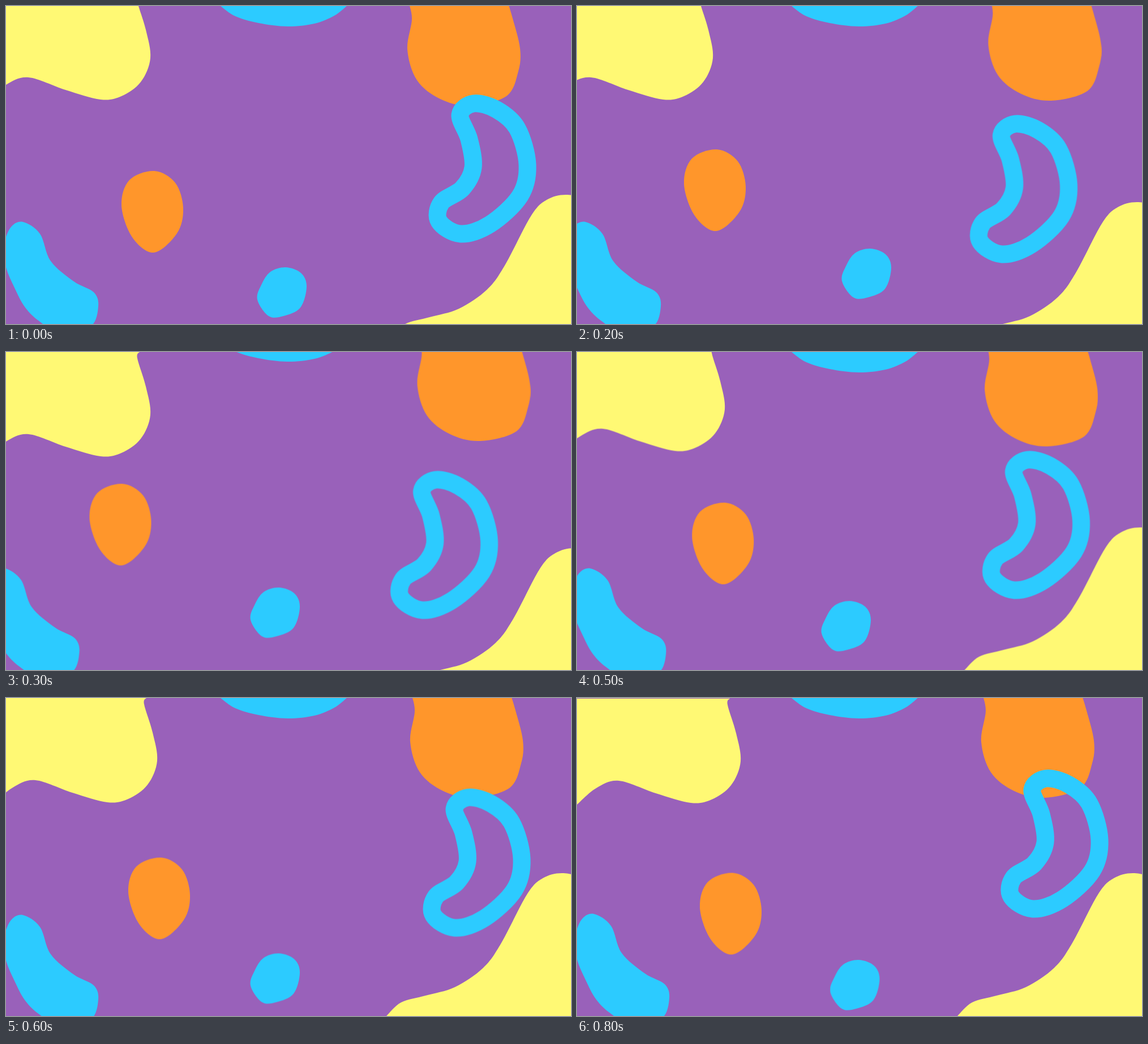
An HTML page that plays this animation: 998 by 561 pixels, repeating every 0.9 s.

```html
<!DOCTYPE html>
<html lang="en">
<head>
<meta charset="utf-8">
<title>Drifting blobs</title>
<style>
  html, body { margin: 0; width: 100%; height: 100%; overflow: hidden; background: #9961ba; }
  svg { display: block; width: 100%; height: 100%; }
</style>
</head>
<body>
<svg id="stage" viewBox="0 0 998 561"></svg>
<script>
const YELLOW = '#fff974', ORANGE = '#ff962b', BLUE = '#2ccbff';
const LOOP = 900, STEPS = 9;
const KEY_STEPS = [0, 2, 3, 4, 6, 8];
const RING_WIDTH = 31;

const stage = document.getElementById('stage');

// Smooth Catmull-Rom curve through "x,y" points, written as cubic Béziers.
// With a tail the curve stays open and ends in those straight edges.
function smoothPath(text, tail) {
  const points = text.split(' ').map(p => p.split(',').map(Number));
  const n = points.length;
  const at = i => points[tail ? Math.max(0, Math.min(n - 1, i)) : (i + n) % n];
  const control = (i, sign) =>
    at(i).map((v, k) => v + sign * (at(i + 1)[k] - at(i - 1)[k]) / 6);
  let d = `M${at(0)}`;
  for (let i = 0; i < (tail ? n - 1 : n); i++) {
    d += ` C${control(i, 1)} ${control(i + 1, -1)} ${at(i + 1)}`;
  }
  return `${d} ${tail}Z`;
}

// Drift holds one "x,y" offset per key step; the motion between them is even.
function addBlob(color, drift, outline, tail = '') {
  const path = document.createElementNS(stage.namespaceURI, 'path');
  path.setAttribute('d', smoothPath(outline, tail));
  path.setAttribute('fill', color);
  stage.append(path);

  const frames = drift.split(' ').map((offset, i) => {
    const [x, y] = offset.split(',');
    return { offset: KEY_STEPS[i] / STEPS, transform: `translate(${x}px, ${y}px)` };
  });
  frames.push({ ...frames.at(-1), offset: 1 });
  path.animate(frames, { duration: LOOP, iterations: Infinity, easing: `steps(${STEPS})` });
  return path;
}

// Corners
addBlob(YELLOW, '0,0 -15,0 0,19 0,0 12,19 34,20',
  '236,-19 232,-8 247,42 255,92 238,134 204,159 167,165 105,148 40,126 0,139 -34,168',
  'L-60,-19');
addBlob(YELLOW, '0,0 0,13 15,13 17.5,-23 -7,-24 -7,-24',
  '679,585 705,561 748,549 800,534 850,500 882,456 927,371 955,342 992,333 1040,345',
  'V620 H679');
addBlob(BLUE, '0,0 -15,0 -33.5,0 -11.5,0 0,2 0,0',
  '30,381 60,402 79,450 120,486 155,505 163,530 150,565 100,580 60,557 34,532 15,497 0,461 -4,425 8,391');

// Top edge
addBlob(BLUE, '0,0 0,0 0,-19 0,0 0,0 0,0',
  '379,0 405,18 446,30 497,36 545,31 580,17 602,0', 'V-30 H379');
addBlob(ORANGE, '0,0 17.5,-9 17.5,-19 17.5,-19 5,0 5,0',
  '709,-12 717,22 709,77 726,131 767,164 820,176 884,159 905,115 908,75 895,22 884,-14',
  'V-40 H709');

// Floating pieces
addBlob(ORANGE, '0,0 -15,-38 -56.5,-58.5 -13.5,-41 12,-9.5 13,17.5',
  '262,291 299,312 313,357 302,401 261,435 223,408 204,352 218,307');
addBlob(BLUE, '0,0 24,-33 -12,-45.5 -12,-33 -12,-10.5 3.5,1',
  '494,461 521,471 531,495 520,532 490,547 464,547 444,518 451,492 467,469');

const ring = addBlob('none', '0,0 -52.5,36 -67.5,53.5 -51,33 -10,3.5 2,-30',
  '826,172 867,183 903,216 921,280 908,335 855,385 803,402 765,380 769,347 806,322 825,285 818,235 802,192');
ring.setAttribute('stroke', BLUE);
ring.setAttribute('stroke-width', RING_WIDTH);
</script>
</body>
</html>
```
